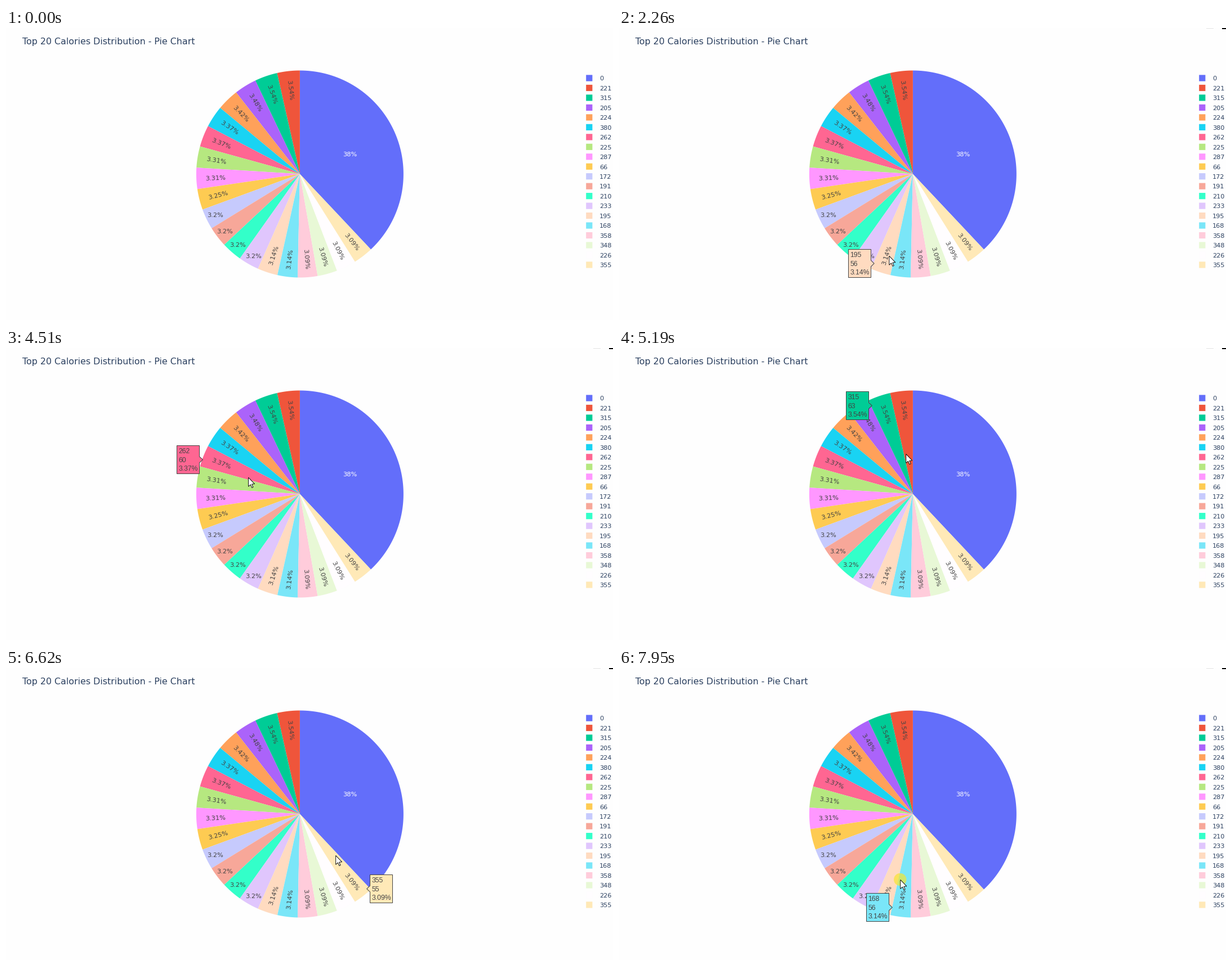
Write a matplotlib script that moves like this. It is 1078 px wide and 519 px high and loops after 8 s.

```python
import colorsys

import matplotlib.pyplot as plt
import numpy as np
from matplotlib.animation import FuncAnimation
from matplotlib.colors import to_rgb
from matplotlib.patches import Circle, Polygon, Rectangle

W, H, DPI = 1078, 519, 100
FRAMES, STEP = 250, 32
CX, CY, R = 521.9, 259.5, 184
NAVY, DARK = "#2a3f5f", "#444444"

NAMES = "0 221 315 205 224 380 262 225 287 66 " \
        "172 191 210 233 195 168 358 348 226 355".split()
COUNTS = np.repeat([677, *range(63, 54, -1)], [1, 2, 1, 1, 2, 2, 1, 4, 2, 4])
BASE = ["#636efa", "#ef553b", "#00cc96", "#ab63fa", "#ffa15a",
        "#19d3f3", "#ff6692", "#b6e880", "#ff97ff", "#fecb52"]

# Pointer stops: time in ms, x, y
STOPS = np.array([
    (190, 760, 522), (990, 606, 395), (1240, 585, 400), (1530, 585, 400),
    (2260, 477, 404), (3200, 413, 317), (3960, 414, 258), (4510, 432, 228),
    (5190, 510, 188), (5580, 562, 198), (6560, 586, 330), (7220, 549, 370),
    (7940, 499, 376)], dtype=float)
TIMES, POINTS = STOPS[:, 0], STOPS[:, 1:]
SPEEDS = np.gradient(POINTS, TIMES, axis=0)
ENTER, CLICK = TIMES[0], 7900
ARROW = np.array([(0, 0), (0, 16), (3.7, 12.6), (6.2, 18.2),
                  (8.4, 17.2), (6, 11.8), (11, 11.4)])


def lighten(color, amount=0.2):
    h, l, s = colorsys.rgb_to_hls(*to_rgb(color))
    return colorsys.hls_to_rgb(h, min(1, l + amount), s)


COLORS = BASE + [lighten(c) for c in BASE]
TOTAL = COUNTS.sum()
SHARES = [f"{100 * n / TOTAL:.3g}%" for n in COUNTS]
# Angles run counterclockwise from twelve o'clock
EDGES = 2 * np.pi * (np.append(0, np.cumsum(COUNTS)) - COUNTS[0]) / TOTAL
MIDS = (EDGES[:-1] + EDGES[1:]) / 2
SINES = np.sin(np.diff(EDGES) / 2)
INSCRIBED = SINES / (1 + SINES)

fig = plt.figure(figsize=(W / DPI, H / DPI), dpi=DPI, facecolor="#fefefe")
ax = fig.add_axes([0, 0, 1, 1])
ax.set_xlim(0, W)
ax.set_ylim(H, 0)
ax.axis("off")


def polar(angle, radius):
    return CX - radius * np.sin(angle), CY - radius * np.cos(angle)


def write(x, y, s, px, color, font="DejaVu Sans", **kw):
    return ax.text(x, y, s, fontsize=px * 72 / DPI, color=color,
                   family=font, **kw)


def draw_slice(i):
    arc = np.linspace(EDGES[i], EDGES[i + 1], 90)
    rim = np.column_stack(polar(arc, R))
    ax.add_patch(Polygon(np.vstack([(CX, CY), rim]), fc=COLORS[i], lw=0))


def draw_label(i):
    upright = i == 0 or COUNTS[i] == 57
    if upright:
        radius, turn = (1 - INSCRIBED[i]) * R, 0
    else:
        radius = 150 if MIDS[i] < 2 else 152
        turn = (np.degrees(MIDS[i]) + 90) % 180
        turn -= 180 if turn > 90 else 0
    x, y = polar(MIDS[i], radius)
    t = np.radians(turn)
    write(x + np.sin(t), y + np.cos(t), SHARES[i], 11.4,
          "white" if i == 0 else DARK, rotation=turn, ha="center", va="center")


def draw_legend(i):
    y = 89 + 17.47 * i
    ax.add_patch(Rectangle((1030.2, y - 5.6), 11.2, 11.2, fc=COLORS[i],
                           lw=0, snap=False))
    write(1054, y + 4.3, NAMES[i], 11.2, NAVY)


for i in range(len(NAMES)):
    draw_slice(i)
for i in range(len(NAMES)):
    draw_label(i)
    draw_legend(i)
write(28.8, 29.5, "Top 20 Calories Distribution - Pie Chart", 15.95, NAVY)

toolbar = [Rectangle((1043, 0), 13, 1, fc="#e2e2e2", lw=0),
           Rectangle((1071, 0), 7, 2, fc="black", lw=0)]
for part in toolbar:
    ax.add_patch(part)

tip = ax.add_patch(Polygon([(0, 0), (1, 0), (1, 1)], ec=DARK,
                           lw=0.72, zorder=5))
tip_lines = [write(0, 0, "", 12.2, DARK, "Liberation Sans", zorder=6)
             for _ in range(3)]
halo = ax.add_patch(Circle((0, 0), 11.2, fc="#f8e52c", alpha=0.68,
                           lw=0, zorder=7))
pointer = ax.add_patch(Polygon(ARROW, fc="white", ec="black",
                               lw=0.65, zorder=8))


def pointer_at(t):
    """Smooth cubic path through the stops."""
    t = np.clip(t, TIMES[0], TIMES[-1])
    k = min(np.searchsorted(TIMES, t, side="right"), len(TIMES) - 1) - 1
    span = TIMES[k + 1] - TIMES[k]
    u = (t - TIMES[k]) / span
    ease = u * u * (3 - 2 * u)
    bend = u * (1 - u) ** 2 * SPEEDS[k] - u * u * (1 - u) * SPEEDS[k + 1]
    return POINTS[k] + ease * (POINTS[k + 1] - POINTS[k]) + span * bend


def hovered(t):
    """Index of the slice under the pointer, or None."""
    if t < ENTER:
        return None
    x, y = pointer_at(t) - (CX, CY)
    if np.hypot(x, y) > R:
        return None
    angle = (np.arctan2(-x, -y) - EDGES[0]) % (2 * np.pi) + EDGES[0]
    return int(np.searchsorted(EDGES, angle) - 1)


def show_tip(i):
    for part in [tip, *tip_lines]:
        part.set_visible(i is not None)
    if i is None:
        return
    x, y = polar(MIDS[i], (1 - INSCRIBED[i]) * R)
    side = -1 if x < CX else 1
    x += side * INSCRIBED[i] * R
    y = np.floor(y) + 0.5
    ems = sum({".": 0.278, "%": 0.889}.get(c, 0.556) for c in SHARES[i])
    near, far = (np.floor(x + side * d) + 0.5
                 for d in (5.6, 11.6 + 12.05 * ems))
    tip.set_xy([(x, y), (near, y - 5.5), (near, y - 25), (far, y - 25),
                (far, y + 25), (near, y + 25), (near, y + 5.5)])
    tip.set_facecolor(COLORS[i])
    rows = NAMES[i], str(COUNTS[i]), SHARES[i]
    for k, (line, s) in enumerate(zip(tip_lines, rows)):
        line.set_text(s)
        line.set_position((min(near, far) + 2.8, y - 11.3 + 15.6 * k))


def update(n):
    t = n * STEP
    for part in [*toolbar, pointer]:
        part.set_visible(t >= ENTER)
    pos = pointer_at(t)
    pointer.set_xy(ARROW + pos + 0.5)
    halo.set_center(pos)
    halo.set_visible(t >= CLICK)
    show_tip(hovered(t - STEP))  # the tip trails the pointer by one step
    return [tip, *tip_lines, halo, pointer, *toolbar]


anim = FuncAnimation(fig, update, frames=FRAMES, interval=STEP,
                     repeat=True, repeat_delay=0)
plt.show()
```
